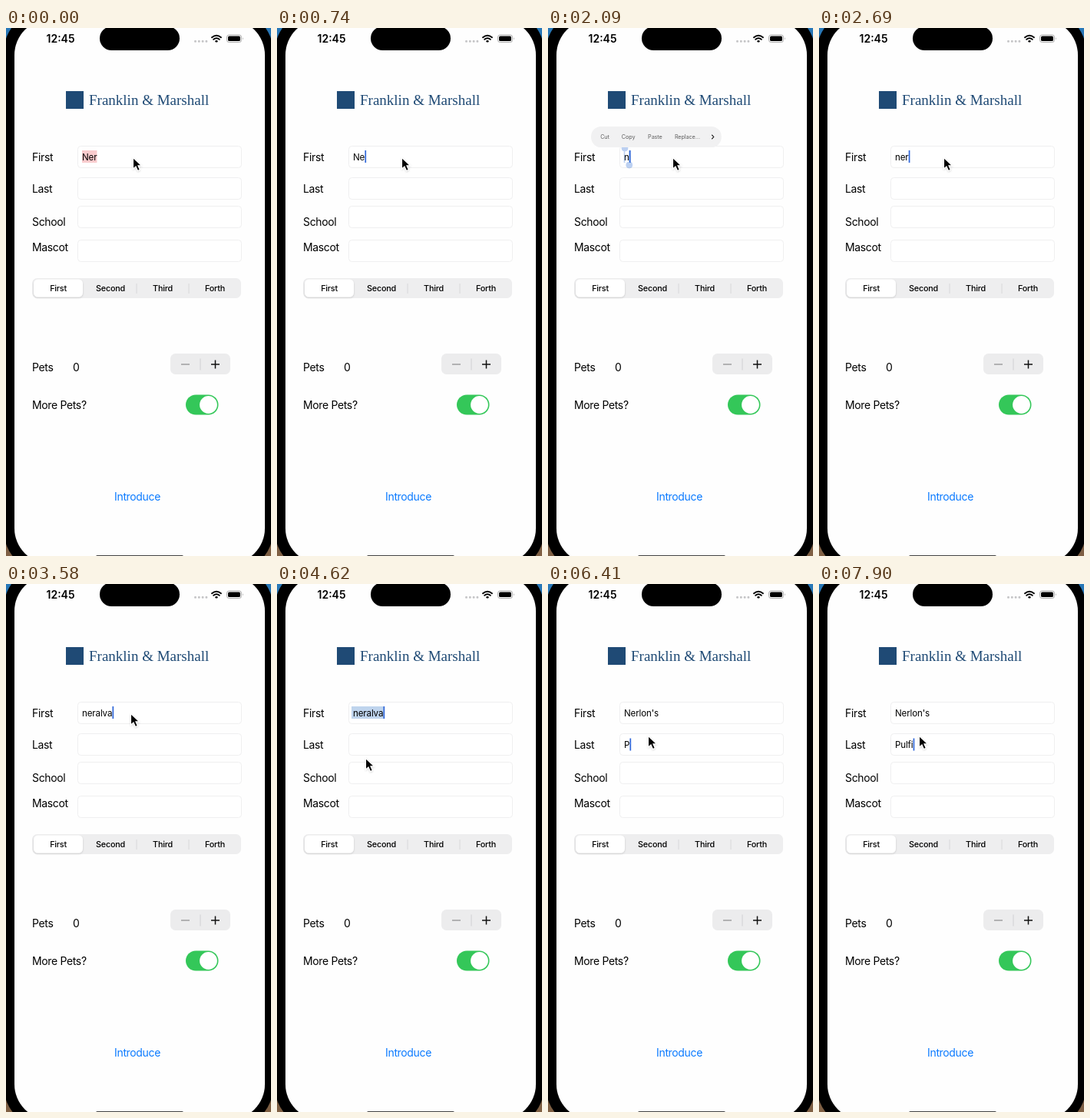
An HTML page for the animation above (8 s loop, 345x686 px).

```html
<!DOCTYPE html>
<html lang="en">
<head>
<meta charset="utf-8">
<title>Introduction form</title>
<style>
  html, body { margin: 0; width: 100%; height: 100%; overflow: hidden; background: #000; }
  svg { display: block; width: 100%; height: 100%; }
  text { font: 14px Inter, "Liberation Sans", sans-serif; letter-spacing: -.35px; }
  .mid { text-anchor: middle; }
  .clock { font-weight: 600; letter-spacing: 0; }
  .name { font: 19px "Liberation Serif", serif; letter-spacing: 0; fill: #1f4a75; }
  .small text { font-size: 10.8px; font-weight: 500; letter-spacing: -.2px; }
  .entry { font-size: 11.6px; letter-spacing: -.15px; }
  .field { fill: #fff; stroke: #efeff0; }
  #menu text { font-size: 12.2px; letter-spacing: -.2px; }
  .line { fill: none; stroke-linecap: round; stroke-linejoin: round; }
</style>
</head>
<body>
<svg viewBox="0 0 345 686">
  <defs>
    <linearGradient id="desk" x2="0" y2="1">
      <stop offset="0" stop-color="#2878b8"/><stop offset=".5" stop-color="#27435c"/>
      <stop offset="1" stop-color="#806044"/>
    </linearGradient>
    <filter id="soft" x="-20%" y="-50%" width="140%" height="220%">
      <feDropShadow dx="0" dy="2" stdDeviation="4" flood-opacity=".16"/>
    </filter>
    <filter id="lift" x="-20%" y="-30%" width="140%" height="180%">
      <feDropShadow dx="0" dy="1" stdDeviation="1.2" flood-opacity=".18"/>
    </filter>
  </defs>

  <rect width="345" height="686" fill="url(#desk)"/>
  <rect x="-3" y="-24" width="351" height="732" rx="56"/>
  <rect x="11" y="-11" width="326" height="707" rx="46" fill="#fefefe"/>
  <rect x="122" y="-2" width="104" height="31" rx="15.5"/>
  <rect x="117" y="685" width="114" height="4" rx="2" fill="#444"/>

  <!-- status bar -->
  <text class="clock" x="52.5" y="19">12:45</text>
  <path class="line" d="M246.5 17.3h15" stroke="#c4c4c6" stroke-width="3" stroke-dasharray="0 4.8"/>
  <g class="line" stroke="#000" stroke-width="1.9">
    <path d="M268 12.2q6-5 12 0M270.2 14.8q3.8-3 7.6 0"/>
    <path d="M273.6 17.3h.8" stroke-width="2.4"/>
  </g>
  <rect x="287.5" y="9" width="19" height="9.6" rx="3" fill="none" stroke="#aaa"/>
  <rect x="289" y="10.5" width="16" height="6.6" rx="1.7"/>
  <path d="M308 12.3q1.8 1.5 0 3z" fill="#aaa"/>

  <rect x="78" y="82" width="23" height="23" fill="#1f4a75"/>
  <text class="name" x="108" y="100">Franklin &amp; Marshall</text>

  <g id="form"></g>

  <!-- segmented control -->
  <rect x="34" y="325" width="272" height="26" rx="6.5" fill="#eeeeef"/>
  <path d="M170 332v13M238 332v13" stroke="#d8d8da"/>
  <rect x="36" y="326.5" width="64" height="23" rx="5.5" fill="#fff" filter="url(#lift)"/>
  <g class="small mid" id="segments"></g>

  <text x="34" y="446">Pets</text>
  <text x="87" y="446">0</text>
  <rect x="214" y="423" width="78" height="27" rx="6.5" fill="#ececed"/>
  <path d="M253 429.5v15" stroke="#d0d0d2"/>
  <path d="M228 437h11" stroke="#939395" stroke-width="1.3"/>
  <path d="M267 437h11M272.5 431.5v11" stroke="#111" stroke-width="1.5"/>
  <text x="34" y="495">More Pets?</text>
  <rect x="234" y="476.5" width="42.5" height="26" rx="13" fill="#34c759"/>
  <circle cx="263.5" cy="489.5" r="11.4" fill="#fff"/>
  <text class="mid" x="171" y="614" fill="#0a7aff">Introduce</text>

  <rect id="mark" height="16"/>
  <text id="first" class="entry" x="99" y="171.5"></text>
  <text id="last" class="entry" x="99" y="213"></text>
  <rect id="caret" width="1.7" height="16" fill="#2f66d9"/>
  <g id="handles" fill="#2468d4" stroke="#2468d4">
    <path d="M99.5 158v17M105.8 159v17" stroke-width="1.6"/>
    <circle cx="100" cy="156" r="4"/><circle cx="105.8" cy="178" r="4"/>
  </g>

  <g id="menu">
    <rect x="25" y="109" width="283" height="45" rx="22" fill="#f1f1f2"/>
    <g id="panel">
      <path filter="url(#soft)" fill="#fafafa"
        d="M40 115H294q8 0 8 8v17q0 8-8 8H108l-6 6h-3l-6-6H40q-8 0-8-8V123q0-8 8-8z"/>
      <path d="M78.5 115v33M134.5 115v33M193.5 115v33M274.5 115v33" stroke="#e4e4e6"/>
    </g>
    <g class="mid" id="commands"></g>
    <path class="line" d="M287.5 127.5l4 4-4 4" stroke="#000" stroke-width="1.7"/>
  </g>

  <path id="pointer" d="M0 0V14.5L3.5 11.3 6 17 8.8 15.8 6.4 10.3H11Z"
    stroke="#fff" stroke-width="1.1" filter="url(#lift)"/>
</svg>

<script>
const $ = id => document.getElementById(id);
const LOOP = 8000;
const TEXT_X = 99;

$('form').innerHTML = [['First', 173, 153], ['Last', 214, 194], ['School', 257, 231], ['Mascot', 290, 275]]
  .map(([label, base, top]) => `<text x="34" y="${base}">${label}</text>
    <rect class="field" x="93.5" y="${top + .5}" width="213" height="28" rx="4"/>`).join('');

const labels = (words, y) => words.map(([word, x]) => `<text x="${x}" y="${y}">${word}</text>`).join('');
$('segments').innerHTML = labels([['First', 68], ['Second', 136], ['Third', 204], ['Forth', 272]], 342);
$('commands').innerHTML = labels([['Cut', 55], ['Copy', 106], ['Paste', 164], ['Replace…', 234]], 135.6);

// Each track holds its value until the next entry.
const typed = 'neralva', surname = 'Pulfi';
const firstTrack = [
  [0, 'Ner'], [740, 'Ne'], [890, 'N'],
  ...[2090, 2540, 2690, 2840, 3140, 3290, 3580].map((t, i) => [t, typed.slice(0, i + 1)]),
  [4920, "Nerlon's"]
];
const lastTrack = [[0, ''],
  ...[6410, 7010, 7300, 7600, 7900].map((t, i) => [t, surname.slice(0, i + 1)])];
const markTrack = [[0, 'pink'], [740, ''], [1040, 'select'], [2090, ''], [4620, 'pending'], [4920, '']];
const menuTrack = [[0, 0], [1040, .6], [1190, 1], [2090, .6], [2240, 0]];
const caretTrack = [[0, ''], [740, 'first'], [1040, ''], [2090, 'first'], [4920, ''], [5070, 'last']];
const pointerTrack = [
  [0, 165, 168], [290, 162, 168],
  [3870, 160, 172], [4020, 152, 186], [4170, 140, 205], [4320, 126, 220], [4470, 115, 226],
  [4770, 116, 217], [5370, 118, 216], [5520, 122, 211], [5670, 126, 205], [5820, 129, 200], [5970, 130, 197]
];
const at = (track, time) => track.findLast(entry => entry[0] <= time);

function show(id, visible) { $(id).style.display = visible ? '' : 'none'; }

function drawMark(kind, width) {
  const styles = {
    pink: ['#f9cbcd', TEXT_X, width],
    select: ['#aac8f0', TEXT_X, 7],
    pending: ['#bfd4ed', TEXT_X - 2, width + 3]
  };
  show('mark', kind);
  if (!kind) return;
  const [fill, x, w] = styles[kind];
  Object.entries({ fill, x, y: 159, width: w }).forEach(([key, value]) => $('mark').setAttribute(key, value));
}

function drawMenu(scale) {
  show('menu', scale);
  if (!scale) return;
  const open = scale === 1;
  const shift = (1 - scale) / .4;
  $('menu').setAttribute('transform', `translate(${41 * shift} ${62.6 * shift}) scale(${scale})`);
  show('panel', open);
  $('commands').style.opacity = open ? 1 : .6;
}

function draw(time) {
  $('first').textContent = at(firstTrack, time)[1];
  $('last').textContent = at(lastTrack, time)[1];
  drawMark(at(markTrack, time)[1], $('first').getComputedTextLength());

  const scale = at(menuTrack, time)[1];
  drawMenu(scale);
  show('handles', scale);
  $('handles').style.opacity = time < 2090 ? 1 : .3;

  const focus = at(caretTrack, time)[1];
  show('caret', focus);
  if (focus) {
    $('caret').setAttribute('x', TEXT_X + $(focus).getComputedTextLength() + .2);
    $('caret').setAttribute('y', focus === 'first' ? 159 : 200.5);
  }

  const [, x, y] = at(pointerTrack, time);
  $('pointer').setAttribute('transform', `translate(${x + .5} ${y + .5})`);
}

const start = performance.now();
function tick() {
  draw((performance.now() - start) % LOOP);
  requestAnimationFrame(tick);
}
tick();
</script>
</body>
</html>
```
